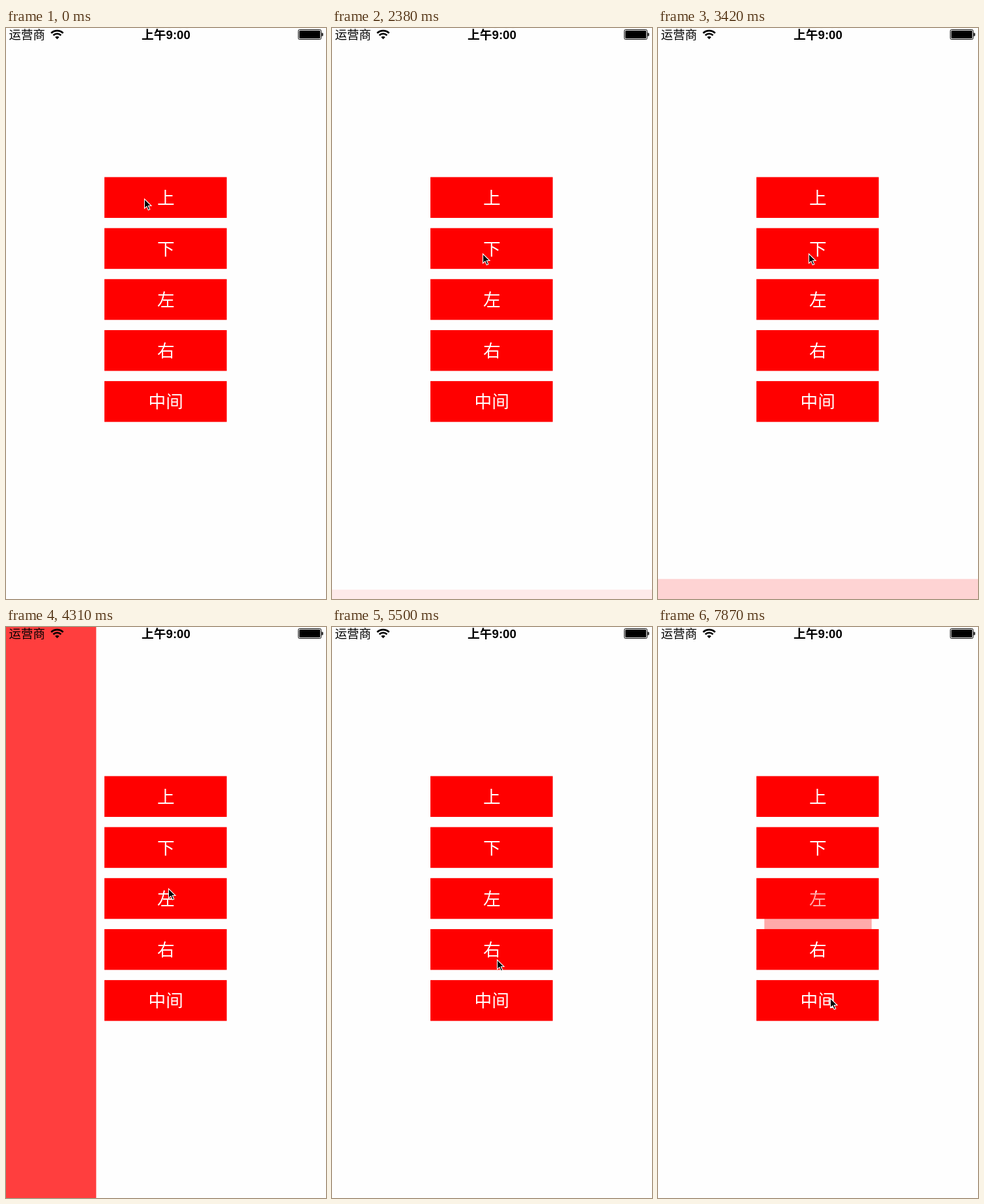
An HTML page for the animation above (8 s loop, 491 by 875 pixels).

```html
<!DOCTYPE html>
<html lang="zh-CN">
<head>
<meta charset="utf-8">
<style>
  html, body { margin: 0; height: 100%; overflow: hidden; background: #fefefe; }
  svg { display: block; width: 100vw; height: 100vh; }
  text { font-family: "Liberation Sans", "Noto Sans CJK SC", "Noto Sans CJK", sans-serif; }
  #buttons text { font-size: 26.7px; font-weight: 300; fill: #fff; text-anchor: middle; }
</style>
</head>
<body>
<svg viewBox="0 0 491 875">
  <g id="buttons"></g>
  <rect id="panel" fill="#f00"/>
  <g id="status">
    <text x="4.5" y="17" font-size="18.5">运营商</text>
    <g fill="none" stroke="#000" stroke-width="2.7">
      <path d="M69.3 7.9A13 13 0 0 1 87.7 7.9M72.6 11.2A8.3 8.3 0 0 1 84.4 11.2"/>
      <path d="M78.5 17.2L75.3 14A4.5 4.5 0 0 1 81.7 14Z" fill="#000" stroke="none"/>
    </g>
    <text x="245.5" y="16.8" font-size="18.7" font-weight="600" text-anchor="middle">上午9:00</text>
    <rect x="448.5" y="2.5" width="35" height="15" rx="2" fill="none" stroke="#000"/>
    <rect x="450" y="4" width="32" height="12" rx="1"/>
    <path d="M484.5 7.5h1q1 0 1 1v3q0 1 -1 1h-1z"/>
  </g>
  <path id="cursor" d="M0 0V14.5L3.4 11.4L5.8 17L8.3 16L5.9 10.5H10.5Z" stroke="#fff" stroke-width="1.1"/>
</svg>
<script>
const LOOP = 8000, DURATION = 300, STEP = 148.5, FIRST_STEP = 590;
const panel = document.getElementById('panel');
const cursor = document.getElementById('cursor');

document.getElementById('buttons').innerHTML = ['上', '下', '左', '右', '中间'].map((label, i) => {
  const y = 228.5 + i * 78.15;
  return `<rect x="151" y="${y}" width="187.7" height="62.5" fill="#f00"/>
    <text x="245.3" y="${y + 41}">${label}</text>`;
}).join('');

// Each panel: show time, hide time, box [x, y, width, height] at progress p
const panels = [
  [550, 1240, p => [10.5, 0, 469, 182 * p]],
  [2320, 3190, p => [0, 875 - 181 * p, 491, 181 * p]],
  [4099, 4960, p => [0, 0, 183 * p, 875]],
  [5784, 6938, p => [491 - 184 * p, 0, 184 * p, 875]],
  [7750, 9000, p => [245.5 * (1 - p), 437.5 - 91 * p, 491 * p, 182 * p]],
];

// Cursor moves: start, end, destination
const moves = [
  [1500, 1770, 231.5, 346],
  [3590, 4000, 249.5, 401],
  [5250, 5480, 253.5, 510],
  [7300, 7560, 264.5, 569],
];

function ease(t, start, end) {
  const u = Math.min(1, Math.max(0, (t - start) / (end - start)));
  return u * u * (3 - 2 * u);
}

function draw(t) {
  let progress = 0, box = [0, 0, 0, 0];
  for (const [show, hide, shape] of panels) {
    const p = ease(t, show, show + DURATION) - ease(t, hide, hide + DURATION);
    if (p > 0) { progress = p; box = shape(p); }
  }
  ['x', 'y', 'width', 'height'].forEach((name, i) => panel.setAttribute(name, box[i]));
  panel.setAttribute('opacity', progress);

  let x = 212.5, y = 262;
  for (const [start, end, toX, toY] of moves) {
    const p = ease(t, start, end);
    x += (toX - x) * p;
    y += (toY - y) * p;
  }
  cursor.setAttribute('transform', `translate(${x} ${y})`);
}

const origin = performance.now();
function tick() {
  const t = Math.max(0, performance.now() - origin) % LOOP;
  // The screen refreshes in coarse, even steps
  draw(FIRST_STEP + Math.floor((t - FIRST_STEP) / STEP) * STEP);
  requestAnimationFrame(tick);
}
tick();
</script>
</body>
</html>
```
